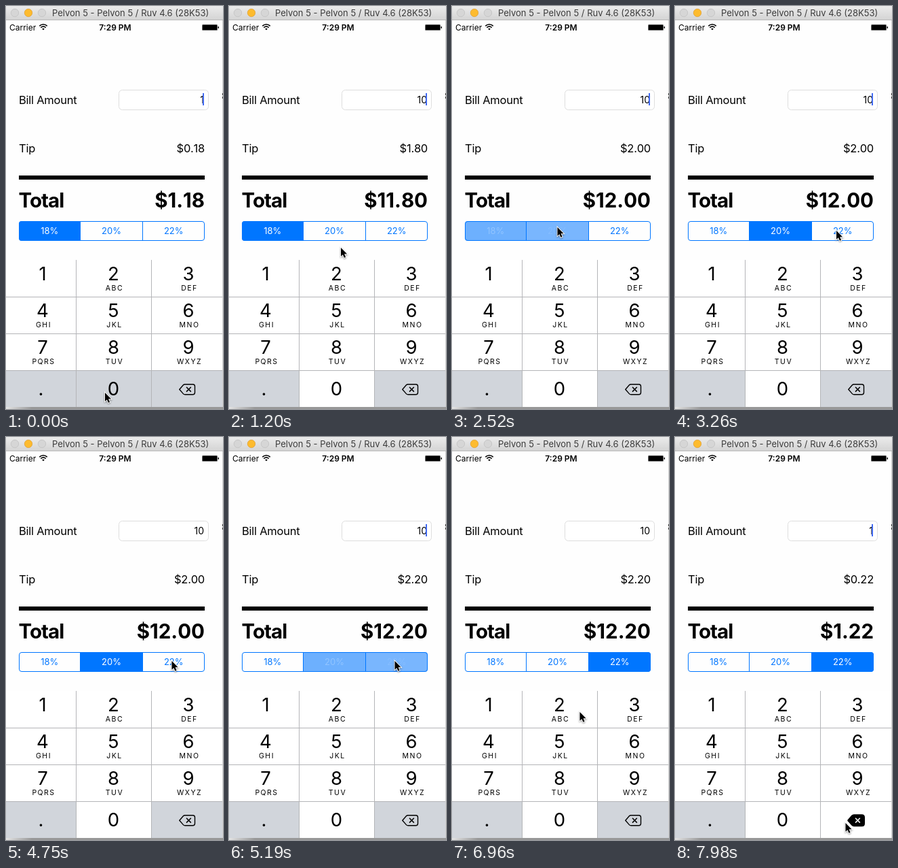
Animation of 320 by 592 pixels, one loop 8 s. Source, as an HTML page:

```html
<!DOCTYPE html>
<html lang="en">
<head>
<meta charset="utf-8">
<title>Tip calculator</title>
<style>
  html, body { margin: 0; width: 100%; height: 100%; overflow: hidden; background: #fefefe; }
  svg { display: block; width: 320px; height: 592px; font-family: Inter, Roboto, sans-serif; }
  .label { font-size: 16.5px; letter-spacing: -.25px; }
  .total { font-size: 29.5px; font-weight: 700; }
  .segment { font-size: 13px; text-anchor: middle; }
  .digit { font-size: 27.5px; text-anchor: middle; }
  .letters { font-size: 10.5px; letter-spacing: 1.5px; text-anchor: middle; }
  .end { text-anchor: end; font-kerning: none; }
  #pointer { filter: drop-shadow(0 1px 1px rgba(0, 0, 0, .4)); }
</style>
</head>
<body>
<svg viewBox="0 0 320 592">
  <defs>
    <linearGradient id="chrome" x2="0" y2="1">
      <stop stop-color="#ebebeb"/><stop offset="1" stop-color="#d3d3d3"/>
    </linearGradient>
    <linearGradient id="shade">
      <stop stop-color="#e4e4e4"/><stop offset=".12" stop-color="#989898"/>
    </linearGradient>
    <clipPath id="pill"><rect x="19" y="316" width="274" height="29" rx="4"/></clipPath>
  </defs>
  <rect width="320" height="592" fill="#fefefe"/>

  <!-- window title bar -->
  <rect width="320" height="21" fill="url(#chrome)"/>
  <rect y="20" width="320" height="1" fill="#b9b9b9"/>
  <g stroke-width=".8">
    <circle cx="13" cy="10" r="5.7" fill="#d6d6d6" stroke="#c2c2c2"/>
    <circle cx="33" cy="10" r="5.7" fill="#fdbb2e" stroke="#e0a136"/>
    <circle cx="53" cy="10" r="5.7" fill="#d6d6d6" stroke="#c2c2c2"/>
  </g>
  <text x="68" y="15" font-size="13" fill="#3c3c3c">Pelvon 5 - Pelvon 5 / Ruv 4.6 (28K53)</text>

  <!-- status bar -->
  <text x="5" y="35.5" font-size="12">Carrier</text>
  <path d="M49.3 29.4a8 8 0 0 1 11.4 0M51.3 31.7a5.2 5.2 0 0 1 7.4 0" fill="none" stroke="#000" stroke-width="1.6"/>
  <path d="M53.2 33.6a2.6 2.6 0 0 1 3.6 0L55 35.5z"/>
  <text x="161" y="35.5" font-size="12" font-weight="600" text-anchor="middle">7:29 PM</text>
  <rect x="289" y="27" width="23" height="9" rx="1.5" fill="#666"/>
  <rect x="290" y="28" width="21" height="7" rx=".5"/>
  <rect x="312.5" y="30" width="1.5" height="3" rx=".7"/>

  <!-- form -->
  <text class="label" x="19" y="143.5">Bill Amount</text>
  <rect x="166.5" y="123.5" width="132" height="29" rx="5" fill="#fff" stroke="#dedede"/>
  <text id="bill" class="end" x="292" y="143" font-size="14"></text>
  <rect id="caret" x="290" y="128" width="2" height="18" fill="#426bf2"/>
  <text class="label" x="19" y="214.5">Tip</text>
  <text id="tip" class="label end" x="293" y="214.5"></text>
  <rect x="19" y="249" width="274" height="6"/>
  <text class="total" x="18.6" y="296" letter-spacing="-1">Total</text>
  <text id="total" class="total end" x="293" y="296"></text>
  <g id="segments"></g>

  <!-- keypad -->
  <g id="keys"></g>
  <path d="M0 427.5H319M0 481.5H319M0 535.5H319M103.5 373V589M214.5 373V589" stroke="#b4b5b8"/>
  <path id="erase" d="M255.8 563.2l5.6-6.4q1-1.1 2.5-1.1h11.6q3 0 3 3v9q0 3-3 3h-11.6q-1.5 0-2.5-1.1z" stroke="#000" stroke-linejoin="round"/>
  <path id="cross" d="M266 559.8l6.8 6.8m0-6.8l-6.8 6.8" stroke-width="1.5"/>

  <!-- window edges -->
  <rect x="319" y="21" width="1" height="568" fill="#d2d2d2"/>
  <path d="M319.5 128v3m0 2v3" stroke="#333"/>
  <rect y="589" width="320" height="3" fill="url(#shade)"/>

  <path id="pointer" d="M0 0V12.8L2.9 10.2L4.9 14.8L7.1 13.9L5.1 9.3H9.1Z" stroke="#fff" stroke-width="1.8" paint-order="stroke"/>
</svg>
<script>
const LOOP = 8000, TICK = 147.7, LAST = 54;
const BLUE = [0, 118, 255], KEY_GRAY = '#d1d5db';
const RATES = [18, 20, 22], EDGES = [19, 109.5, 201.5, 293];
const $ = id => document.getElementById(id);
const clamp = v => Math.min(1, Math.max(0, v));

function add(parent, tag, attrs, text = '') {
  const node = document.createElementNS('http://www.w3.org/2000/svg', tag);
  for (const name in attrs) node.setAttribute(name, attrs[name]);
  node.textContent = text;
  return parent.appendChild(node);
}

const fills = RATES.map((_, i) => add($('segments'), 'rect', {
  x: EDGES[i], y: 316, width: EDGES[i + 1] - EDGES[i], height: 29,
  fill: `rgb(${BLUE})`, 'clip-path': 'url(#pill)'
}));
const outline = { fill: 'none', stroke: `rgb(${BLUE})` };
add($('segments'), 'rect', { x: 19.5, y: 316.5, width: 273, height: 28, rx: 3.5, ...outline });
add($('segments'), 'path', { d: 'M109.5 316.5v28M201.5 316.5v28', ...outline });
const captions = RATES.map((rate, i) => add($('segments'), 'text', {
  class: 'segment', x: (EDGES[i] + EDGES[i + 1]) / 2, y: 335
}, rate + '%'));

const LETTERS = ['', 'ABC', 'DEF', 'GHI', 'JKL', 'MNO', 'PQRS', 'TUV', 'WXYZ'];
const KEY_LEFT = [0, 104, 215], KEY_WIDTH = [103, 110, 104], KEY_MIDDLE = [54, 158.5, 269];
const keys = ['1', '2', '3', '4', '5', '6', '7', '8', '9', '.', '0', ''].map((digit, i) => {
  const col = i % 3, top = 373 + 54 * Math.floor(i / 3);
  const key = add($('keys'), 'rect', { x: KEY_LEFT[col], y: top, width: KEY_WIDTH[col], height: 54, fill: '#fff' });
  const x = digit === '.' ? 51.5 : KEY_MIDDLE[col];
  add($('keys'), 'text', { class: 'digit', x, y: top + (i < 9 ? 30 : 37) }, digit);
  add($('keys'), 'text', { class: 'letters', x: x + 1.5, y: top + 45 }, LETTERS[i]);
  return key;
});
keys[9].setAttribute('fill', KEY_GRAY);

// Pointer stops: time, x, y
const STOPS = [
  [450, 146, 568], [1182, 165, 355], [1480, 161, 341], [1910, 155.5, 325],
  [2700, 155.5, 325], [3250, 238, 330], [3780, 244.5, 329], [5950, 244.5, 329],
  [6640, 180, 396], [6940, 188.5, 404], [7100, 188, 404], [7820, 251.5, 567]
];

function pointerAt(t) {
  const next = STOPS.findIndex(stop => stop[0] > t);
  if (next < 0) return STOPS[STOPS.length - 1].slice(1);
  if (next === 0) return STOPS[0].slice(1);
  const [t0, x0, y0] = STOPS[next - 1], [t1, x1, y1] = STOPS[next];
  const u = (t - t0) / (t1 - t0), ease = u * u * (3 - 2 * u);
  return [x0 + (x1 - x0) * ease, y0 + (y1 - y0) * ease];
}

// Selection strength of each segment: touch tint, cross-fade, settled
function segmentLevels(tick) {
  if (tick < 15) return [1, 0, 0];
  if (tick < 17) return [1, .12, 0];
  if (tick < 18) return [.57, .52, 0];
  if (tick < 34) return [0, 1, 0];
  if (tick < 35) return [0, 1, .12];
  if (tick < 36) return [0, .57, .52];
  return [0, 0, 1];
}

// The caret blinks once a second and shows fully while typing
function caretLevel(tick, t) {
  if (tick < 3 || tick === LAST) return 1;
  const phase = (t - 20) % 1000;
  return clamp(phase / 150) - clamp((phase - 510) / 170);
}

function draw(now) {
  const tick = Math.min(LAST, Math.floor(now % LOOP / TICK)), t = tick * TICK;
  const erasing = tick === LAST;
  const bill = tick === 0 || erasing ? 1 : 10;
  const tip = bill * RATES[tick < 17 ? 0 : tick < 35 ? 1 : 2] / 100;

  $('bill').textContent = bill;
  $('tip').textContent = '$' + tip.toFixed(2);
  $('total').textContent = '$' + (bill + tip).toFixed(2);
  $('caret').setAttribute('opacity', caretLevel(tick, t));

  segmentLevels(tick).forEach((level, i) => {
    fills[i].setAttribute('opacity', level);
    captions[i].setAttribute('fill', `rgb(${BLUE.map(c => Math.round(c + (255 - c) * level))})`);
  });

  keys[10].setAttribute('fill', tick === 0 ? KEY_GRAY : '#fff');
  keys[11].setAttribute('fill', erasing ? '#fff' : KEY_GRAY);
  $('erase').setAttribute('fill', erasing ? '#000' : 'none');
  $('erase').setAttribute('stroke-width', erasing ? 3 : 1.4);
  $('cross').setAttribute('stroke', erasing ? '#fff' : '#000');
  $('pointer').setAttribute('transform', `translate(${pointerAt(t)})`);
}

const start = performance.now();
function loop() {
  draw(performance.now() - start);
  requestAnimationFrame(loop);
}
loop();
</script>
</body>
</html>
```
